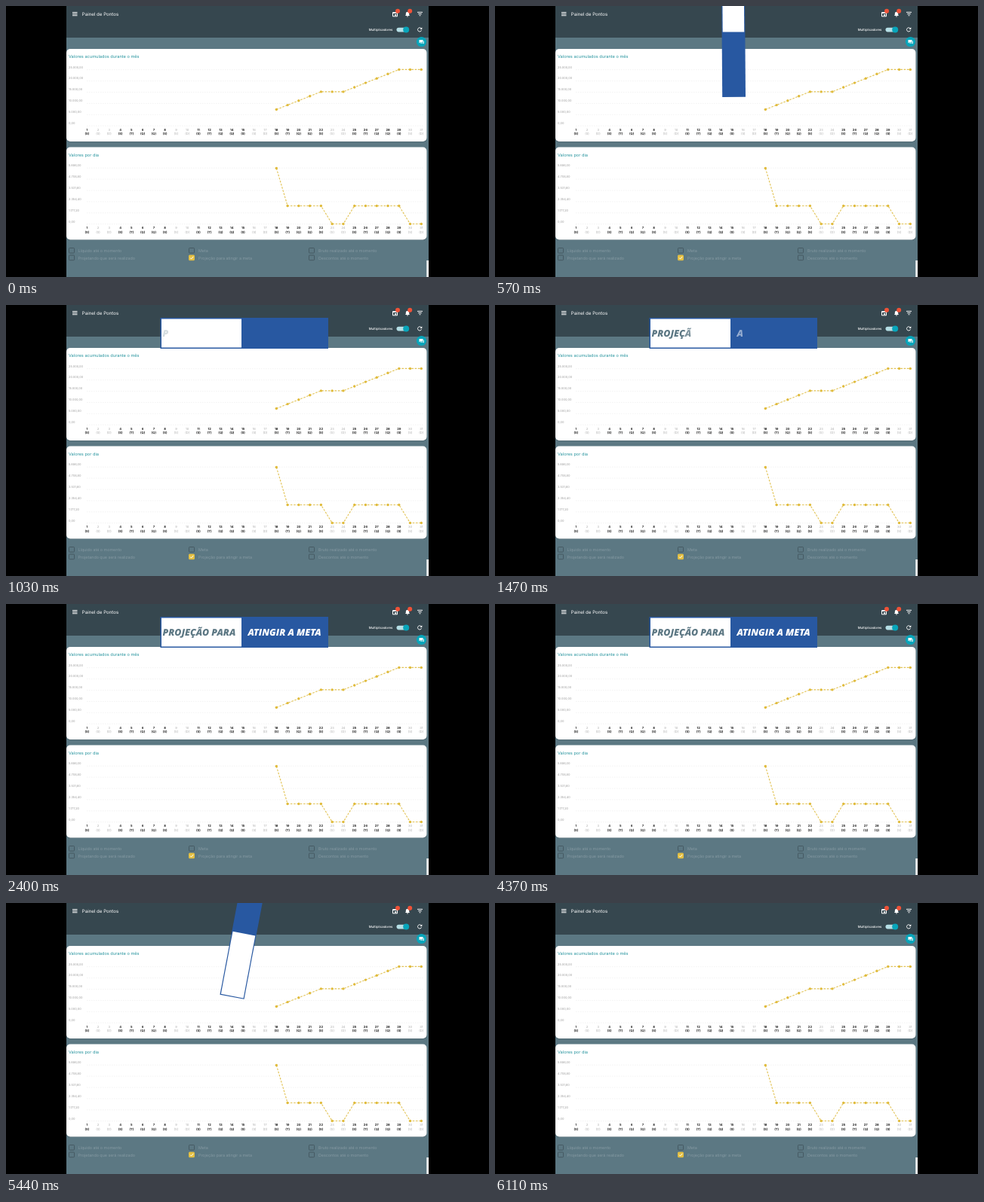
An HTML page that plays this animation: 640 by 360 pixels, repeating every 6200 ms.

```html
<!DOCTYPE html>
<html lang="pt">
<head>
<meta charset="utf-8">
<style>
  html, body { margin: 0; width: 100%; height: 100%; overflow: hidden; background: #000; }
  svg { display: block; width: 640px; height: 360px; font-family: Inter, sans-serif; text-rendering: geometricPrecision; }
  .word { font: italic 800 12.4px "Open Sans", sans-serif; }
</style>
</head>
<body>
<svg viewBox="0 0 640 360">
  <rect x="80" width="480" height="360" fill="#5c7883"/>
  <rect x="80" width="480" height="42" fill="#36474f"/>
  <g id="page"></g>

  <g fill="none" stroke="#fff">
    <path d="M88 8.5h6.5M88 10.6h6.5M88 12.7h6.5M545 8.3h7M546.3 10.5h4.4M547.5 12.7h2"/>
    <path d="M512.5 8.5h6v5.3h-6zM512.5 9.3h6"/>
    <path d="M550.2 29.8a2.6 2.6 0 1 0 .4 2.4" stroke-width=".9"/>
  </g>
  <path d="M529 13c1-1 .8-1.500 .8-3a2.200 2.200 0 0 1 4.400 0c0 1.500-.2 2 .8 3zM531 13.500h2a1 1 0 0 1-2 0zM551.300 28.300v2.700h-2.700z" fill="#fff"/>
  <rect x="515" y="11" width="2.200" height="1.800" fill="#fff"/>
  <g fill="#ef5238"><circle cx="519" cy="6.800" r="3"/><circle cx="535.200" cy="6.800" r="3"/></g>
  <rect x="517.500" y="28.800" width="15" height="5.600" rx="2.800" fill="#b5dfe6"/>
  <circle cx="530.200" cy="31.600" r="4" fill="#08a5ba"/>
  <circle cx="550.500" cy="47.500" r="6.600" fill="#08a5ba"/>
  <path d="M547.500 45h5v3.500h-4l-1 1zM553 46.500h.8v4l-1-1h-3.800v-.6h4z" fill="#fff"/>
  <rect x="557.300" y="338" width="2.700" height="22" fill="#fff"/>

  <g id="banner">
    <rect x="-111.500" y="-20.500" width="222.500" height="41" fill="#2858a1"/>
    <rect x="-110" y="-19" width="106" height="38" fill="#fff"/>
    <text class="word" x="-108.500" y="4.500" fill="#5d7884"></text>
    <text class="word" x="4.500" y="4.500" fill="#fff"></text>
  </g>
</svg>
<script>
const NS = "http://www.w3.org/2000/svg";
const page = document.getElementById("page");
const banner = document.getElementById("banner");
const words = banner.querySelectorAll("text");

function add(tag, attrs, parent = page, text = "") {
  const el = document.createElementNS(NS, tag);
  for (const k in attrs) el.setAttribute(k, attrs[k]);
  el.textContent = text;
  return parent.appendChild(el);
}
const label = (text, x, y, size, fill, more) =>
  add("text", { x, y, "font-size": size, fill, ...more }, page, text);

const dayX = d => 107.3 + (d - 1) * 14.767;
const isWeekend = d => d % 7 === 2 || d % 7 === 3;

function chart(top, height, title, scale, levelY) {
  add("rect", { x: 80, y: top + .6, width: 477.5, height, rx: 5, fill: "#455c66" });
  add("rect", { x: 80, y: top, width: 477.5, height, rx: 5, fill: "#fff" });
  label(title, 83, top + 12.2, 5.65, "#27949e");
  scale.forEach((s, i) => {
    const y = top + 27.7 + i * 14.9;
    label(s, 83, y - 2.2, 3.95, "#999");
    add("path", { d: `M107 ${y}H553`, stroke: "#e6e6e6", "stroke-width": .5, "stroke-dasharray": "1.5 1.5" });
  });
  for (let d = 1; d <= 31; d++) {
    const look = { "text-anchor": "middle", "font-weight": isWeekend(d) ? 400 : 700 };
    const fill = isWeekend(d) ? "#aaa" : "#222";
    label(d, dayX(d), top + 108.6, 4.1, fill, look);
    label(`(${"SSDSTQQ"[(d - 1) % 7]})`, dayX(d), top + 114.2, 4.1, fill, look);
  }
  const points = [];
  for (let d = 18; d <= 31; d++) points.push([dayX(d), levelY(d)]);
  add("polyline", { points: points.join(" "), fill: "none", stroke: "#e2c355", "stroke-width": 1.1, "stroke-dasharray": "2.6 1.7" });
  for (const [cx, cy] of points) add("circle", { cx, cy, r: 1.7, fill: "#e0bb3c" });
}

label("Painel de Pontos", 100.8, 12.8, 6.15, "#fff");
label("Multiplicadores", 480.7, 33.1, 4.3, "#fff", { "font-weight": 500 });
label("11", 519, 8.2, 3.3, "#fff", { "text-anchor": "middle" });
label("9+", 535.2, 8.2, 3.3, "#fff", { "text-anchor": "middle" });

let total = 143.4;
chart(57, 123, "Valores acumulados durante o mês",
  ["25.000,00", "20.000,00", "15.000,00", "10.000,00", "5.000,00", "0,00"],
  d => total -= isWeekend(d) ? 0 : 5.9);
chart(187.5, 123, "Valores por dia",
  ["5.886,00", "4.708,80", "3.531,60", "2.354,40", "1.177,20", "0,00"],
  d => d === 18 ? 215.5 : isWeekend(d) ? 289.5 : 265.5);

[[83.5, 95.5, "Líquido até o momento", "Projetando que será realizado"],
 [242.5, 255, "Meta", "Projeção para atingir a meta"],
 [401.5, 414, "Bruto realizado até o momento", "Descontos até o momento"]
].forEach(([boxX, textX, ...rows], col) => rows.forEach((text, row) => {
  const y = 321.5 + row * 9.6, on = col === 1 && row === 1;
  add("rect", { x: boxX, y, width: 7, height: 6.6, rx: .8, fill: on ? "#e6c040" : "none", stroke: on ? "#e6c040" : "#43565f", "stroke-width": .9 });
  if (on) add("path", { d: `M${boxX + 1.5} ${y + 3.4}l1.500 1.600 2.700-3.200`, fill: "none", stroke: "#fff" });
  label(text, textX, y + 5.4, 5.35, "#869aa3");
}));

const letters = ["PROJEÇÃO PARA", "ATINGIR A META"].map((s, i) =>
  [...s].map(c => add("tspan", {}, words[i], c)));

const LOOP = 6200;
const clamp = v => Math.max(0, Math.min(1, v));
const ramp = (t, from, length) => clamp((t - from) / length);

function draw(t) {
  const enter = 1 - Math.sin(ramp(t, 30, 1000) * Math.PI / 2);
  const leave = 1 - Math.cos(ramp(t, 4970, 1140) * Math.PI / 2);
  const size = 1 - enter - leave;
  banner.setAttribute("visibility", size > .001 ? "visible" : "hidden");
  banner.setAttribute("transform",
    `translate(316 37.5) rotate(${360 * enter - 390 * leave}) scale(${size})`);
  const fade = 1 - ramp(t, 4400, 530);
  letters.forEach((word, w) => word.forEach((el, i) =>
    el.setAttribute("fill-opacity", fade * ramp(t, [1010, 1430][w] + i * 66, 80))));
}

const start = performance.now();
function tick() {
  draw((performance.now() - start) % LOOP);
  requestAnimationFrame(tick);
}
draw(0);
tick();
</script>
</body>
</html>
```
